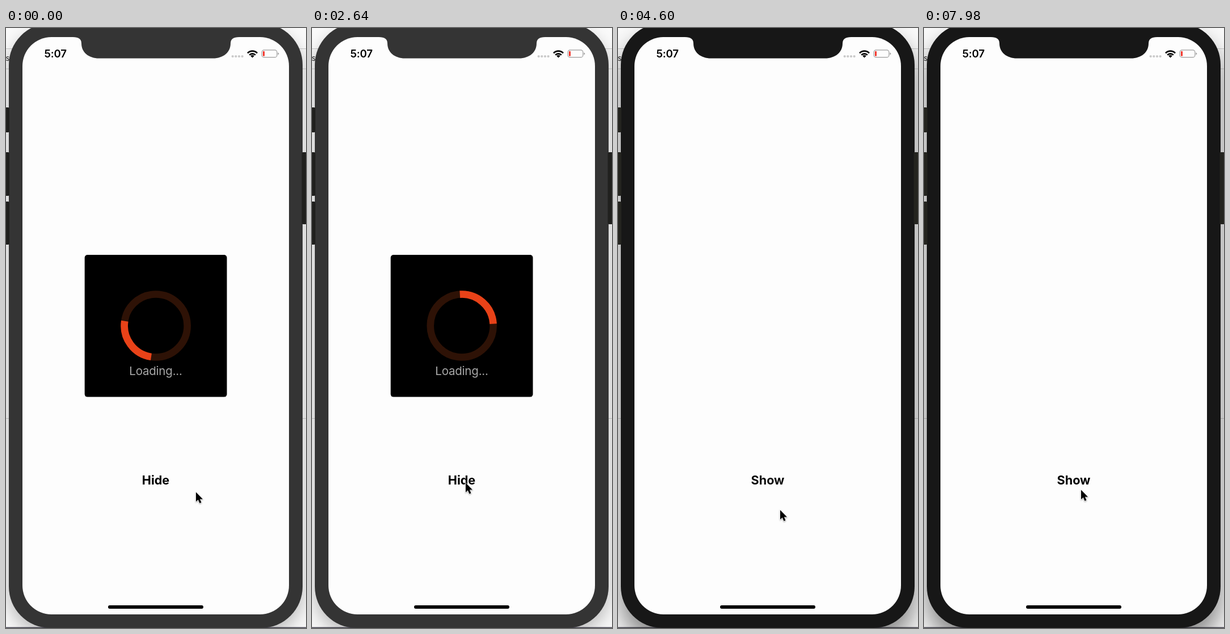
These frames come from a looping animation (529x1058 px, 8 s). An HTML page:

```html
<!DOCTYPE html>
<html lang="en">
<head>
<meta charset="utf-8">
<title>Loading indicator</title>
<style>
  html, body { margin: 0; width: 100%; height: 100%; overflow: hidden; background: #f7f7f7; }
  svg { display: block; width: 100vw; height: 100vh; --bezel: #343434; --key: #20201e; }
  svg.active { --bezel: #171717; --key: #24241f; }
  text { font-family: Inter, Roboto, sans-serif; }
  .body { fill: var(--bezel); }
  .case { fill: var(--bezel); filter: drop-shadow(0 12px 14px rgba(0, 0, 0, .24)); }
  .lifted .case { filter: drop-shadow(0 24px 20px rgba(0, 0, 0, .46)); }
  .keys { fill: var(--key); }
  .rules { stroke: #c9c9c9; }
  .clock { font-size: 18.7px; font-weight: 600; letter-spacing: -.2px; }
  .note { font-size: 20.5px; letter-spacing: -.2px; fill: #a6a6a6; text-anchor: middle; }
  .button { font-size: 21.6px; font-weight: 700; text-anchor: middle; }
  .ring { fill: none; stroke-width: 12.6; }
  #cursor { filter: drop-shadow(0 1.5px 1px rgba(0, 0, 0, .35)); }
</style>
</head>
<body>
<svg id="stage" viewBox="0 0 529 1058" preserveAspectRatio="none">
  <!-- window behind the phone -->
  <rect width="529" height="36" fill="#fafafa"/>
  <g class="rules">
    <path d="M0 36.5H529M0 72H529M0 688.5H529"/>
  </g>
  <text x="-8" y="58" font-size="13" fill="#222">es</text>
  <rect y="1056.5" width="529" height="2" fill="#4c4a58"/>

  <!-- phone -->
  <rect class="case" x="5" y="-8" width="518" height="1066" rx="73"/>
  <g class="keys">
    <rect x="-6" y="140" width="12" height="44" rx="2.5"/>
    <rect x="-6" y="219" width="12" height="77" rx="2.5"/>
    <rect x="-6" y="306" width="12" height="76" rx="2.5"/>
    <rect x="521.5" y="219" width="12" height="127" rx="2.5"/>
  </g>
  <rect x="29" y="16" width="470" height="1018" rx="51" fill="#fdfdfd"/>
  <path class="body" d="M118 15V16Q133 16 133 27C133 43 146 53.5 164 53.5H365C383 53.5 396 43 396 27Q396 16 411 16V15Z"/>

  <!-- status bar -->
  <text class="clock" x="67.5" y="52">5:07</text>
  <g fill="#c9c9c9">
    <circle cx="399.7" cy="50" r="2.1"/><circle cx="405.3" cy="50" r="2.1"/>
    <circle cx="411" cy="50" r="2.1"/><circle cx="416.6" cy="50" r="2.1"/>
  </g>
  <g fill="none" stroke="#000" stroke-width="2.7">
    <path d="M426 44.2A12 12 0 0 1 443 44.2"/>
    <path d="M429.2 47.6A7.4 7.4 0 0 1 439.8 47.6"/>
  </g>
  <path d="M434.5 52.4L431.3 49.2A4.5 4.5 0 0 1 437.7 49.2Z"/>
  <rect x="451.2" y="38.9" width="26.6" height="12.8" rx="3.8" fill="none" stroke="#9c9c9c" stroke-width="1.2"/>
  <path d="M479.3 43.2Q481.2 43.8 481.2 45.3T479.3 47.4Z" fill="#9c9c9c"/>
  <rect x="453" y="40.8" width="3" height="9" rx="1.3" fill="#f0352b"/>

  <!-- progress panel -->
  <g id="panel">
    <rect x="138.7" y="400" width="250.8" height="250.6" rx="5"/>
    <circle class="ring" cx="264.2" cy="525" r="55.5" stroke="#2e1206"/>
    <path id="arc" class="ring" d="M264.2 469.5A55.5 55.5 0 0 1 319.7 525" stroke="#e84218"/>
    <text class="note" x="264" y="612">Loading...</text>
  </g>

  <text id="button" class="button" x="264" y="804.5">Hide</text>
  <rect x="180" y="1018" width="168" height="6" rx="3"/>

  <path id="cursor" d="M0 0V16.8L3.8 13.3L6.5 19.6L9.5 18.3L6.9 12.2H12Z" stroke="#fff" stroke-width="1.3" paint-order="stroke"/>
</svg>
<script>
  const LOOP = 8000;
  const $ = id => document.getElementById(id);
  const stage = $('stage'), panel = $('panel'), arc = $('arc');
  const button = $('button'), cursor = $('cursor');

  // Each key: step, then values
  const path = [
    [0, 335, 818.5], [18, 335, 818.5], [26, 309.5, 815.5], [34, 296, 807],
    [42, 271, 802], [89, 271, 802], [98, 286, 850], [105, 295, 867],
    [107, 294, 864.5], [143, 294, 864.5], [161, 283, 832], [171, 277, 814.5]
  ];
  const press = [[75, 1], [76, .94], [79, .3], [87, .3], [98, .94], [101, 1]];
  const fade = [[84, 1], [87, 0]];

  function at(keys, n) {
    const i = keys.findIndex(k => k[0] > n);
    if (i === 0) return keys[0].slice(1);
    if (i < 0) return keys[keys.length - 1].slice(1);
    const a = keys[i - 1], b = keys[i];
    const p = (n - a[0]) / (b[0] - a[0]);
    return a.slice(1).map((v, j) => v + (b[j + 1] - v) * p);
  }

  // Steps come in threes: 20, 100 and 20 ms long
  function stepAt(t) {
    const r = t % 140;
    return Math.floor(t / 140) * 3 + (r < 20 ? 0 : r < 120 ? 1 : 2);
  }

  function draw(t) {
    const n = stepAt(t);
    const [x, y] = at(path, n);
    cursor.setAttribute('transform', `translate(${x} ${y})`);
    arc.setAttribute('transform', `rotate(${188.5 + 3 * n} 264.2 525)`);
    panel.setAttribute('opacity', at(fade, n)[0]);
    button.setAttribute('opacity', at(press, n)[0]);
    button.textContent = n < 85 ? 'Hide' : 'Show';
    stage.classList.toggle('active', n >= 75);
    stage.classList.toggle('lifted', n >= 78);
  }

  const start = performance.now();
  function tick() {
    draw((performance.now() - start) % LOOP);
    requestAnimationFrame(tick);
  }
  tick();
</script>
</body>
</html>
```
